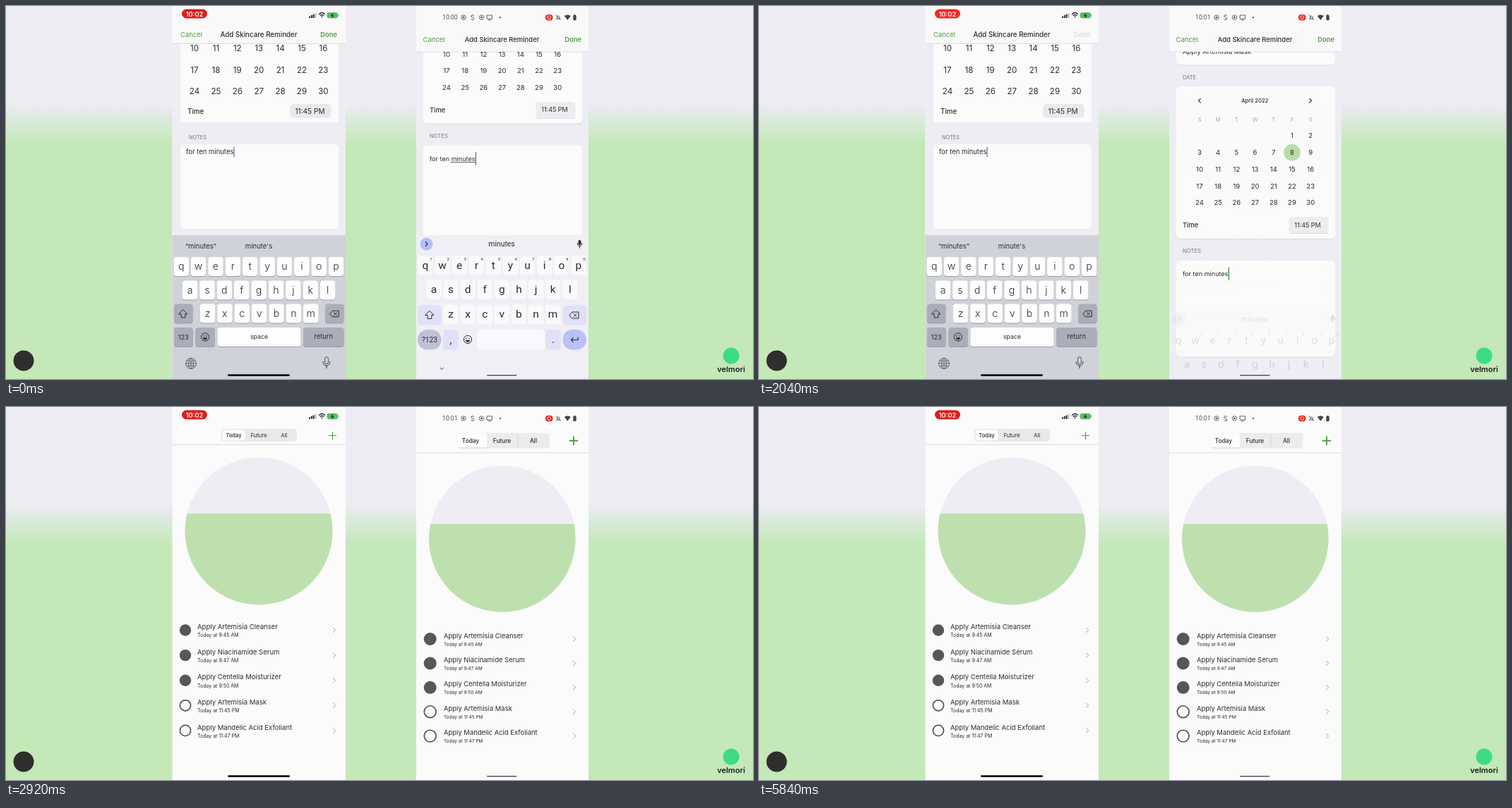
An HTML page that plays this animation: 1058x529 px, repeating every 5960 ms.

```html
<!DOCTYPE html>
<html lang="en">
<head>
<meta charset="utf-8">
<title>Skincare reminder on two phones</title>
<style>
  html, body { margin: 0; width: 100%; height: 100%; overflow: hidden; background: #c4e8b7; }
  svg { display: block; width: 100%; height: 100%; }
  text { font-family: Inter, Roboto, sans-serif; white-space: pre; }
  .roboto { font-family: Roboto, Inter, sans-serif; }
</style>
</head>
<body>
<svg id="stage" viewBox="0 0 1058 529">
  <defs>
    <linearGradient id="sky" x2="0" y2="1">
      <stop offset=".26" stop-color="#eeedf3"/>
      <stop offset=".31" stop-color="#d9eada"/>
      <stop offset=".37" stop-color="#c4e8b7"/>
    </linearGradient>
    <clipPath id="leftClip"><rect x="235.5" width="245.5" height="529"/></clipPath>
    <clipPath id="rightClip"><rect x="581" width="244" height="529"/></clipPath>
    <clipPath id="scrollClip"><rect x="581" y="65" width="244" height="464"/></clipPath>
  </defs>
  <rect width="1058" height="529" fill="url(#sky)"/>
</svg>
<script>
const LOOP = 5960;
const INK = '#2c2c2e', GREEN = '#4f9f3c', LEAF = '#bee0ae', LILAC = '#eeedf3', SHEET = '#fbfbfb';
const stage = document.getElementById('stage');

function el(parent, tag, attrs = {}) {
  const node = document.createElementNS('http://www.w3.org/2000/svg', tag);
  for (const key in attrs) node.setAttribute(key, attrs[key]);
  return parent.appendChild(node);
}
const group = (parent, attrs) => el(parent, 'g', attrs);
const box = (parent, x, y, w, h, fill, rx = 0, attrs = {}) =>
  el(parent, 'rect', { x, y, width: w, height: h, fill, rx, ...attrs });
const dot = (parent, cx, cy, r, fill, attrs = {}) => el(parent, 'circle', { cx, cy, r, fill, ...attrs });
const line = (parent, d, stroke = INK, width = 1, attrs = {}) =>
  el(parent, 'path', { d, fill: 'none', stroke, 'stroke-width': width, 'stroke-linecap': 'round', 'stroke-linejoin': 'round', ...attrs });

// y is the vertical centre of the capitals
function label(parent, x, y, string, size, attrs = {}) {
  const node = el(parent, 'text', { x, y: y + size * 0.364, 'font-size': size, fill: INK, ...attrs });
  node.textContent = string;
  return node;
}
const mid = (parent, x, y, string, size, attrs = {}) =>
  label(parent, x, y, string, size, { 'text-anchor': 'middle', ...attrs });

const TASKS = [['Cleanser', '9:45 AM'], ['Serum', '9:47 AM'], ['Moisturizer', '9:50 AM'], ['Mask', '11:45 PM'], ['Exfoliant', '11:47 PM']];
const HERBS = ['Artemisia', 'Niacinamide', 'Centella', 'Artemisia', 'Mandelic Acid'];

function taskList(parent, { x, textX, arrowX, y, step, r, size, subSize }) {
  return TASKS.map(([kind, time], i) => {
    const row = group(parent), cy = y + step * i;
    if (i < 3) dot(row, x, cy, r, '#575759');
    else dot(row, x, cy, r - 0.6, 'none', { stroke: '#4a4a4c', 'stroke-width': 1.6 });
    label(row, textX, cy - 4.8, `Apply ${HERBS[i]} ${kind}`, size);
    label(row, textX, cy + 7.3, 'Today at ' + time, subSize);
    line(row, `M${arrowX - 1.5} ${cy - 3.3}l3.2 3.3l-3.2 3.3`, '#a2a2a6');
    return row;
  });
}

function bowl(parent, cx, cy, r, level) {
  dot(parent, cx, cy, r, LILAC);
  const half = Math.sqrt(r * r - (cy - level) ** 2);
  el(parent, 'path', { d: `M${cx - half} ${level}A${r} ${r} 0 1 0 ${cx + half} ${level}Z`, fill: LEAF });
}

function header(parent, { left, right, cx, y, size }) {
  label(parent, left, y, 'Cancel', 9.5, { fill: GREEN });
  mid(parent, cx, y, 'Add Skincare Reminder', size, { 'font-weight': 550 });
  return label(parent, right, y, 'Done', 9.4, { fill: GREEN, 'font-weight': 600, 'text-anchor': 'end' });
}

function backspace(parent, x, y, s = 1) {
  line(parent, `M${x - 7 * s} ${y}l${4 * s} ${-4.5 * s}h${9 * s}v${9 * s}h${-9 * s}zM${x - s} ${y - 2 * s}l${4 * s} ${4 * s}m0 ${-4 * s}l${-4 * s} ${4 * s}`);
}
function shift(parent, x, y) {
  line(parent, `M${x} ${y - 5.5}l6 6h-3.2v5h-5.6v-5h-3.2z`);
}
function mic(parent, x, y, s, fill) {
  box(parent, x - 2.2 * s, y - 7 * s, 4.4 * s, 9 * s, fill, 2.2 * s, { stroke: INK, 'stroke-width': 0.8 });
  line(parent, `M${x - 4.5 * s} ${y - 1 * s}c0 ${7 * s} ${9 * s} ${7 * s} ${9 * s} 0M${x} ${y + 4.5 * s}v${3 * s}`);
}
function smile(parent, x, y) {
  dot(parent, x, y, 5.6, 'none', { stroke: INK });
  dot(parent, x - 2, y - 1.5, 0.8, INK);
  dot(parent, x + 2, y - 1.5, 0.8, INK);
  el(parent, 'path', { d: `M${x - 3} ${y + 0.8}h6a3 3 0 0 1-6 0z`, fill: INK });
}
function wifi(parent, x, y) {
  line(parent, `M${x - 4} ${y - 1.5}q4-4 8 0M${x - 2.3} ${y + 0.6}q2.3-2.2 4.6 0`, INK, 1.4);
  dot(parent, x, y + 2.5, 1, INK);
}

// ---------- left phone ----------
const left = group(stage, { 'clip-path': 'url(#leftClip)' });
box(left, 235, 0, 247, 529, SHEET);
mid(left, 322, 40, '', 1);
box(left, 305, 31, 107, 18, '#e9e9ec', 5);
box(left, 306, 32, 33, 16, '#fff', 4.5, { stroke: '#d8d8dc', 'stroke-width': 0.6 });
['Today', 'Future', 'All'].forEach((name, i) => mid(left, 322.5 + i * 35.6, 40.2, name, 7.7, { 'font-weight': i ? 400 : 550 }));
line(left, 'M457.5 40.5h10M462.5 35.5v10', GREEN, 1.2);
line(left, 'M235 53.3h247', '#d4d4d6', 0.8);
bowl(left, 358, 176, 104.5, 151.3);
taskList(left, { x: 254, textX: 271, arrowX: 465, y: 316.5, step: 35.6, r: 8.2, size: 9.55, subSize: 7 });
const shade = box(left, 235, 0, 247, 529, '#000');

const leftPanels = group(left);
box(leftPanels, 235, 0, 247, 529, LILAC);
box(leftPanels, 235, 0, 247, 53, '#f9f9fa');
box(leftPanels, 247, 53.5, 224, 111.5, SHEET);
box(leftPanels, 247, 150, 224, 15, SHEET, 6);
box(leftPanels, 247, 196, 224, 120, SHEET, 6);
line(leftPanels, 'M235 53.3h247', '#d4d4d6', 0.8);

const leftText = group(left);
const leftDone = header(leftText, { left: 247, right: 469, cx: 358, y: 40.3, size: 9.75 });
for (let day = 10; day <= 30; day++)
  mid(leftText, 267 + (day - 10) % 7 * 30.4, 60 + Math.floor((day - 10) / 7) * 30.3, day, 11.6);
label(leftText, 257, 149, 'Time', 9.8, { 'font-weight': 500 });
box(leftText, 402, 139, 58.5, 19.5, '#e9e9ec', 5);
const leftTime = mid(leftText, 430.5, 149, '11:45 PM', 10.1);
label(leftText, 259, 186.5, 'NOTES', 7.4, { fill: '#77777c' });
const leftNote = group(leftText);
label(leftNote, 255, 207, 'for ten minutes', 9.5);
const leftCaret = box(leftNote, 322.3, 200, 1.6, 14, '#7d8fd8');

const leftKeys = group(left);
box(leftKeys, 235, 325, 247, 210, '#cfd2d9');
mid(leftKeys, 276, 340.5, '“minutes”', 9.6);
mid(leftKeys, 358, 340.5, "minute's", 9.6);
function leftKey(x, y, w, fill = '#fdfdfe') {
  box(leftKeys, x, y - 12.5, w, 27, '#9a9da5', 4);
  box(leftKeys, x, y - 13.5, w, 27, fill, 4);
}
[['qwertyuiop', 248.2, 369.5], ['asdfghjkl', 260.6, 403], ['zxcvbnm', 285.5, 436]].forEach(([letters, x0, y]) =>
  [...letters].forEach((letter, i) => {
    const x = x0 + i * 24.38;
    leftKey(x - 10.8, y, 21.6);
    mid(leftKeys, x, y - 0.5, letter, 14.2, { 'font-weight': 350 });
  }));
const GREY_KEY = '#a9aeb9';
leftKey(238, 436, 26.5, GREY_KEY);
leftKey(452, 436, 26.5, GREY_KEY);
leftKey(238, 469.5, 27, GREY_KEY);
leftKey(268.5, 469.5, 27.5, GREY_KEY);
leftKey(299.5, 469.5, 118);
leftKey(421, 469.5, 57.5, GREY_KEY);
shift(leftKeys, 251, 436.5);
backspace(leftKeys, 465.5, 436.5, 0.95);
mid(leftKeys, 251.3, 469.5, '123', 9.2);
smile(leftKeys, 282, 469.5);
mid(leftKeys, 358.5, 469, 'space', 8.8);
mid(leftKeys, 449.7, 469, 'return', 9.4);
line(leftKeys, 'M254.5 507h15M262 499.5v15M256 503q6 2.4 12 0M256 511q6-2.4 12 0', '#5a5c62', 0.9);
dot(leftKeys, 262, 507, 7.5, 'none', { stroke: '#5a5c62', 'stroke-width': 0.9 });
el(leftKeys, 'ellipse', { cx: 262, cy: 507, rx: 3.6, ry: 7.5, fill: 'none', stroke: '#5a5c62', 'stroke-width': 0.9 });
mic(leftKeys, 454, 505.5, 1.1, 'none');

const recording = box(left, 249, 4.5, 36, 13, '#e0201c', 6.5);
mid(left, 267, 11.2, '10:02', 9.2, { fill: '#fff', 'font-weight': 600 });
for (let i = 0; i < 4; i++) box(left, 429 + i * 2.8, 14.5 - i * 1.4, 2, 2.5 + i * 1.4, i < 3 ? INK : '#b5b5b8', 0.5);
wifi(left, 447.5, 13);
box(left, 455, 9.5, 14.5, 7.5, '#43c95a', 2.2, { stroke: '#8d8d90', 'stroke-width': 0.7 });
line(left, 'M470.8 12v2.4', '#8d8d90');
line(left, 'M463 10.6l-2.3 3h3.2l-2.3 2.8', INK, 1.1);
box(left, 314, 522.3, 88, 2.6, '#111', 1.3);

// ---------- right phone ----------
const right = group(stage, { 'clip-path': 'url(#rightClip)' });
box(right, 580, 0, 246, 529, SHEET);
box(right, 640, 37, 130, 21.5, '#ececef', 4);
box(right, 640, 37.3, 41, 20.7, '#fdfdfd', 4);
line(right, 'M641 58h39', '#c9c9cc', 0.8);
line(right, 'M725 41v14', '#cfcfd3', 0.8);
[['Today', 658], ['Future', 702.5], ['All', 747]].forEach(([name, x]) => mid(right, x, 47.7, name, 8.3, { 'font-weight': 500 }));
line(right, 'M798.5 47.7h11M804 42.2v11', GREEN, 1.9);
line(right, 'M580 65h246', '#d4d4d6', 0.8);
bowl(right, 702.8, 187, 103.8, 166);
const rightRows = taskList(right, { x: 600.7, textX: 620, arrowX: 805, y: 329, step: 34.4, r: 9, size: 9.45, subSize: 6.55 });

const rightPanels = group(right);
box(rightPanels, 580, 0, 246, 529, LILAC);
const panelScroll = group(group(rightPanels, { 'clip-path': 'url(#scrollClip)' }));
function card(y, h) {
  box(panelScroll, 590.5, y + 1, 226, h, '#dadade', 6);
  box(panelScroll, 590.5, y, 226, h, SHEET, 6);
}
card(50, 33.5);
card(114, 216);
card(361, 136.5);
box(rightPanels, 580, 0, 246, 65, '#f9f9fa');
line(rightPanels, 'M580 65h246', '#d9d9dc', 0.8);

const rightText = group(right);
const textScroll = group(group(rightText, { 'clip-path': 'url(#scrollClip)' }));
label(textScroll, 600, 65, 'Apply Artemisia Mask', 9.45);
const SMALL = { fill: '#77777c' };
label(textScroll, 600, 101.5, 'DATE', 7.5, SMALL);
line(textScroll, 'M625.3 131.3l-2.8 2.9l2.8 2.9M779.7 131.3l2.8 2.9l-2.8 2.9', INK, 1.2);
mid(textScroll, 702.3, 134, 'April 2022', 7.7, { 'font-weight': 500 });
const column = i => 624 + i * 26.2;
[...'SMTWTFS'].forEach((name, i) => mid(textScroll, column(i), 161.3, name, 8, { fill: '#a8a8ac' }));
dot(textScroll, 755, 207.8, 11.8, '#b7dea7');
for (let day = 1; day <= 30; day++)
  mid(textScroll, column((day + 4) % 7), 184 + Math.floor((day + 4) / 7) * 23.7, day, 9.6);
label(textScroll, 600, 310.5, 'Time', 9.4, { 'font-weight': 500 });
box(textScroll, 750.5, 299, 56, 23, '#ededf0', 4);
line(textScroll, 'M752 322.5h53', '#d4d4d8', 0.8);
mid(textScroll, 777, 310.5, '11:45 PM', 9);
label(textScroll, 600, 347.5, 'NOTES', 7.7, SMALL);
label(textScroll, 600, 380, 'for ten minutes', 9.1);
const underline = line(textScroll, 'M630 385h35', INK, 0.8);
const rightCaret = box(textScroll, 664.8, 370.5, 1.2, 18.5, '#3d8a35');
header(rightText, { left: 590.5, right: 815, cx: 702.5, y: 47.7, size: 9.45 });

const rightKeys = group(right);
box(rightKeys, 580, 325, 246, 210, '#f0eff5');
dot(rightKeys, 595.5, 337.6, 9, '#b6bff6');
line(rightKeys, 'M594.3 334.8l2.8 2.8l-2.8 2.8', INK, 1.3);
mid(rightKeys, 702, 337.5, 'minutes', 10.4, { class: 'roboto' });
mic(rightKeys, 812.5, 337.5, 0.75, INK);
[['qwertyuiop', 594, 367.5], ['asdfghjkl', 606, 402], ['zxcvbnm', 630, 437]].forEach(([letters, x0, y], row) =>
  [...letters].forEach((letter, i) => {
    const x = x0 + i * 24.1;
    box(rightKeys, x - 10.7, y - 13.5, 21.4, 27.5, '#f9f9fb', 4);
    mid(rightKeys, x, y - 0.5, letter, 15.5, { class: 'roboto' });
    if (!row) mid(rightKeys, x + 8, y - 8.5, (i + 1) % 10, 6, { class: 'roboto' });
  }));
const PALE = '#e0e1f8';
box(rightKeys, 583, 424.5, 34, 28, PALE, 5);
box(rightKeys, 788.5, 424.5, 34, 28, PALE, 5);
box(rightKeys, 583, 459, 33.5, 28.5, '#bfc1d8', 14);
box(rightKeys, 619, 459, 22, 28.5, PALE, 5);
box(rightKeys, 667, 459, 96, 28.5, '#f9f9fb', 5);
box(rightKeys, 764, 459, 22, 28.5, PALE, 5);
box(rightKeys, 788.5, 459, 33.5, 28.5, '#b9c1f8', 14);
shift(rightKeys, 600, 438);
backspace(rightKeys, 805, 438.5);
mid(rightKeys, 600, 473, '?123', 10.3, { class: 'roboto' });
mid(rightKeys, 630, 473, ',', 14);
smile(rightKeys, 654, 473);
mid(rightKeys, 775, 473, '.', 14);
line(rightKeys, 'M810 470.2v3.3h-9.5m2.8-2.8l-2.8 2.8l2.8 2.8', INK, 1.2);
line(rightKeys, 'M614.8 513l2.5 2.5l2.5-2.5', INK, 0.9);

const clock = label(right, 618, 16.2, '10:00', 8.7, { class: 'roboto', fill: '#55555a' });
for (const x of [648, 673.5]) {
  dot(right, x, 16.2, 3.3, 'none', { stroke: '#55555a', 'stroke-width': 0.9 });
  dot(right, x, 16.2, 1.4, '#55555a');
}
line(right, 'M662.8 14q-2-2.4-3.6-.6t1.6 2.8t1.6 3q-1.6 1.6-3.6-.6', '#55555a', 1);
line(right, 'M681.5 13h7v5.3h-7zM683.3 20h3.4', '#55555a', 0.9);
dot(right, 700, 16.3, 1.1, '#333');
box(right, 764, 12, 10.5, 8.5, '#e92a20', 4);
dot(right, 769.2, 16.2, 2.4, 'none', { stroke: '#fff', 'stroke-width': 0.8 });
line(right, 'M779.5 18.3h5.4l-.9-1.3v-2q-1.7-2.6-3.5 0v2zM778.8 12.8l6.8 7', '#55555a', 0.9);
el(right, 'path', { d: 'M790.8 14q4.5-3 9 0l-4.5 6z', fill: '#44444a' });
box(right, 803.3, 13, 4.4, 7.2, '#44444a', 1);
box(right, 804.6, 12, 1.8, 1.5, '#44444a');
box(right, 681, 523, 42.5, 1.6, '#55555a', 0.8);

// ---------- corner marks ----------
dot(stage, 25, 503, 14.5, '#2e2e2e');
dot(stage, 1027, 496, 11.5, '#3ddc84');
mid(stage, 1027, 514.8, 'velmori', 11, { 'font-weight': 600, fill: '#1c1c1c' });

// ---------- motion ----------
const clamp = v => Math.max(0, Math.min(1, v));
const ramp = (t, from, to) => clamp((t - from) / (to - from));
const smooth = u => u * u * (3 - 2 * u);
const fade = (node, value) => node.setAttribute('opacity', value);
const moveY = (node, y) => node.setAttribute('transform', `translate(0 ${y})`);
const write = (node, string) => { if (node.textContent !== string) node.textContent = string; };

function render(t) {
  const pulse = 0.5 + 0.5 * Math.cos((t - 2200) / (LOOP / 4) * 2 * Math.PI);
  recording.setAttribute('fill', `rgb(${222 + 33 * pulse},${28 + 12 * pulse},${27 + 8 * pulse})`);
  const caretOn = t < 2080 && t % 1000 < 500 ? 1 : 0;
  const closed = t >= 2080;

  fade(leftCaret, caretOn);
  fade(leftNote, closed ? 0 : 1);
  fade(leftPanels, 1 - ramp(t, 2060, 2100));
  fade(leftText, closed ? 0.9 * (1 - ramp(t, 2080, 2240)) : 1);
  fade(shade, closed ? 0.31 * (1 - ramp(t, 2080, 2300)) : 0);
  write(leftTime, closed ? '10:01 PM' : '11:45 PM');
  write(leftDone, closed ? 'Edit' : 'Done');
  leftDone.setAttribute('fill', t >= 1960 && !closed ? '#dcdfdc' : GREEN);
  moveY(leftKeys, 205 * (1 - (1 - ramp(t, 2060, 2350)) ** 1.8));

  const dismissed = t >= 1960;
  write(clock, t < 640 ? '10:00' : '10:01');
  moveY(panelScroll, dismissed ? 0 : -163.3);
  moveY(textScroll, dismissed ? 0 : -163.3);
  fade(underline, dismissed ? 0 : 1);
  fade(rightCaret, caretOn);
  const keysGone = ramp(t, 1920, 2060);
  moveY(rightKeys, 123 * keysGone);
  fade(rightKeys, 1 - keysGone);
  const form = 1 - ramp(t, 2040, 2340);
  fade(rightPanels, form);
  fade(rightText, Math.min(1, form * 1.4));
  fade(rightRows[3], ramp(t, 2320, 2520));
  moveY(rightRows[4], -34.4 * (1 - smooth(ramp(t, 2120, 2430))));
}

const start = performance.now();
function frame() {
  render((performance.now() - start) % LOOP);
  requestAnimationFrame(frame);
}
frame();
</script>
</body>
</html>
```
